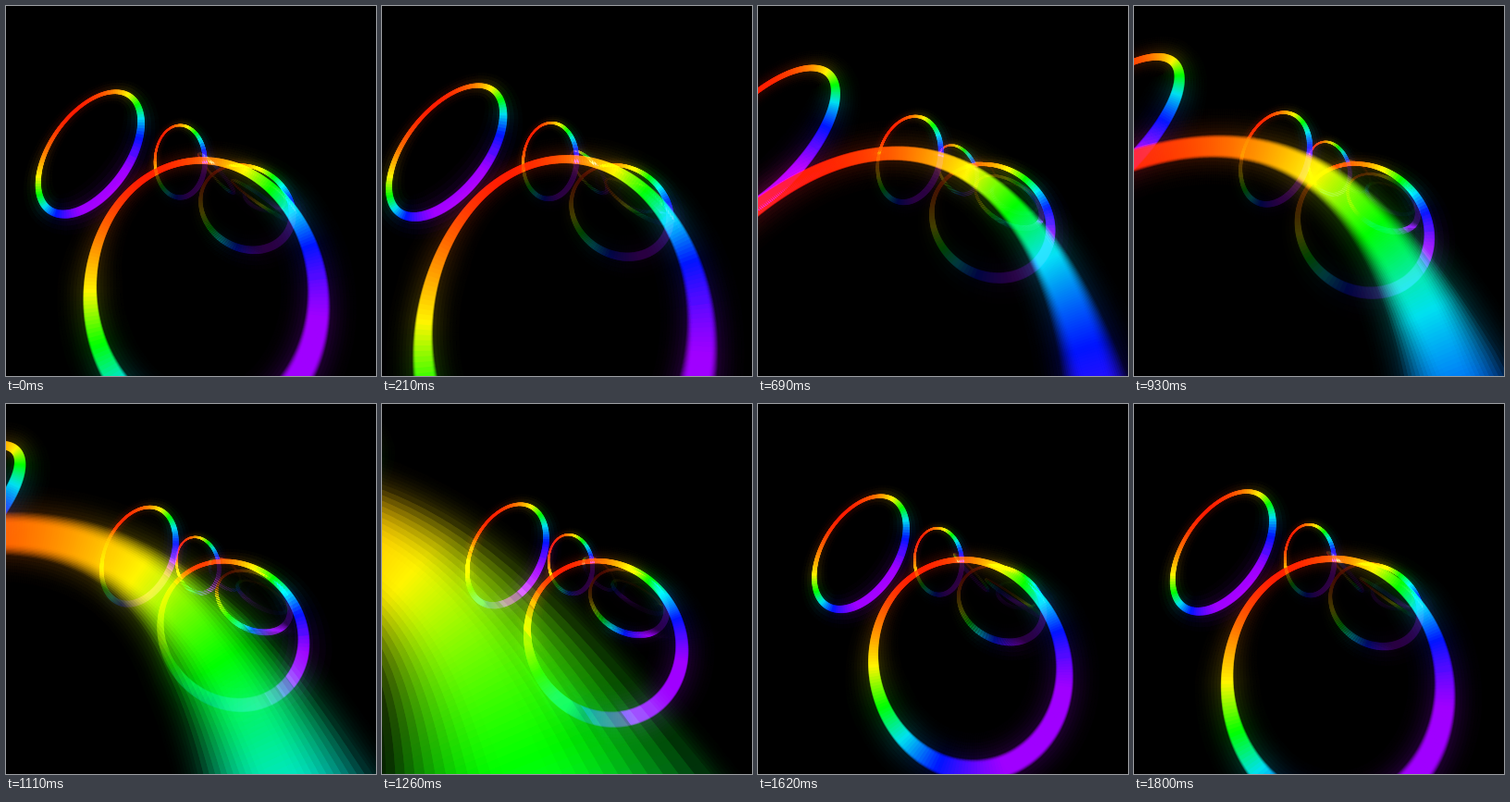
Animation, 400 px wide and 400 px high, one loop 1.83 s. Source, as an HTML page with a canvas:

```html
<!DOCTYPE html>
<html lang="en">
<head>
<meta charset="utf-8">
<title>Rainbow rings</title>
<style>
  html, body { margin: 0; width: 100%; height: 100%; overflow: hidden; background: #000; }
  canvas { display: block; width: 400px; height: 400px; }
</style>
</head>
<body>
<canvas id="stage" width="400" height="400"></canvas>
<script>
const SIZE = 400, LOOP = 1830, STEP = 30, SPACING = 1860;
const SEGMENTS = 720, GLOW_LAYERS = 8, EDGE_LAYERS = 12;
const PURPLE_ANGLE = 44 * Math.PI / 180;
const STOPS = [
  [0, 255, 30, 0], [.13, 255, 125, 0], [.29, 255, 245, 0], [.46, 0, 255, 0],
  [.61, 0, 225, 240], [.77, 0, 20, 255], [.95, 160, 0, 255], [1, 160, 0, 255]
];

const ctx = document.getElementById('stage').getContext('2d');
const buffer = document.createElement('canvas');
buffer.width = buffer.height = SIZE;
const pen = buffer.getContext('2d');

const clamp = (v, lo, hi) => Math.min(hi, Math.max(lo, v));

function rainbow(s) {
  const i = Math.max(1, STOPS.findIndex(stop => stop[0] >= s));
  const from = STOPS[i - 1], to = STOPS[i];
  const k = clamp((s - from[0]) / (to[0] - from[0]), 0, 1);
  return [1, 2, 3].map(c => from[c] + (to[c] - from[c]) * k);
}

// Layers run from the faint outer glow to the bright core.
const layers = [];
for (let i = 0; i < GLOW_LAYERS; i++) {
  const reach = 1 - i / GLOW_LAYERS;
  layers.push({ glow: reach, edge: 1, light: .01 + .17 * (1 - reach) ** 1.6 });
}
for (let i = 0; i < EDGE_LAYERS; i++) {
  const k = i / (EDGE_LAYERS - 1);
  layers.push({ glow: 0, edge: 1 - 2 * k, light: .2 + .8 * Math.sin(k * Math.PI / 2) });
}
const coarseLayers = layers.filter((_, i) => i % 2);
const COVER = [.5, 0, -.5].map(edge => ({ glow: 0, edge }));

const tones = Array.from({ length: SEGMENTS }, (_, i) => {
  const angle = i / SEGMENTS * 2 * Math.PI;
  const shade = (1 + Math.cos(angle - PURPLE_ANGLE)) / 2;
  const color = rainbow(shade);
  const fills = new Map(layers.map(l => [l, `rgb(${color.map(c => Math.round(c * l.light))})`]));
  return { cos: Math.cos(angle), sin: Math.sin(angle), shade, fills };
});

// Distant rings turn through an edge-on view before they open.
const openness = age => Math.tanh(4 * (age + 1.08));

function rightRing(age) {
  const past = Math.max(age, 0), ahead = Math.min(age, 0);
  const open = age < 0 ? openness(age) : 1;
  const lean = Math.sqrt(1 - open * open);
  const w = 80 - 7 * past ** 2.5;
  return {
    vx: 286, vy: 176, z: 1.62 - age, dz: -.175,
    x: -42 - 9 * ahead, y: 60 - 25 * ahead,
    ax: w * open, ay: 12 * open,
    bx: 4 + lean * w, by: 66 + 15 * Math.max(ahead, -1.3)
  };
}

function leftRing(age) {
  const past = Math.max(age, 0), ahead = Math.min(age, 0);
  const lean = age < 0 ? Math.sqrt(1 - openness(age) ** 2) : -.5 * age;
  const open = age < 0 ? openness(age) : Math.sqrt(1 - lean * lean);
  const w = 63 + 11 * past;
  return {
    vx: 310, vy: 180, z: 2.33 - age, dz: 0,
    x: -284 - 8 * age, y: -28 - 30 * ahead,
    ax: w * open, ay: 0,
    bx: lean * w, by: 91 - 3 * past ** 4 + 20 * Math.max(ahead, -1.3)
  };
}

function project(ring, tone) {
  const z = ring.z + ring.dz * tone.sin;
  if (z < .04) return null;
  const width = Math.min(260, (4.5 + 7.5 * tone.shade) / z * (1 + .06 / z));
  return {
    x: ring.vx + (ring.x + ring.ax * tone.cos + ring.bx * tone.sin) / z,
    y: ring.vy + (ring.y + ring.ay * tone.cos + ring.by * tone.sin) / z,
    width,
    soft: clamp((width - 4) / 80, .12, .75) * width,
    glow: Math.min(56, 6 + 4 * width),
    fills: tone.fills
  };
}

function addNormals(points) {
  const count = points.length;
  points.forEach((p, i) => {
    const before = points[(i + count - 1) % count] || p;
    const after = points[(i + 1) % count] || p;
    if (!p) return;
    const dx = after.x - before.x, dy = after.y - before.y;
    const length = Math.hypot(dx, dy) || 1;
    p.nx = -dy / length;
    p.ny = dx / length;
  });
}

function addBand(path, points, layer) {
  const half = p => (p.width + p.soft * layer.edge + p.glow * layer.glow) / 2;
  points.forEach(p => path.lineTo(p.x + p.nx * half(p), p.y + p.ny * half(p)));
  points.reverse().forEach(p => path.lineTo(p.x - p.nx * half(p), p.y - p.ny * half(p)));
  points.reverse();
  path.closePath();
}

function visible(p) {
  const margin = p.width + p.glow;
  return p.x > -margin && p.x < SIZE + margin && p.y > -margin && p.y < SIZE + margin;
}

function drawRing(ring) {
  const strength = clamp(2.3 - ring.z / 2, 0, 1);
  if (!strength) return;
  const step = ring.z > 2.2 ? 10 : ring.z > 1 ? 6 : ring.z > .4 ? 3 : 1;
  const points = tones.filter((_, i) => i % step === 0).map(tone => project(ring, tone));
  addNormals(points);
  const count = points.length;
  const bands = points
    .map((p, i) => [p, points[(i + 1) % count], points[(i + 2) % count]])
    .filter(band => band.every(Boolean) && band.some(visible));
  if (!bands.length) return;

  // Each ring hides most of what lies behind it, then adds its own light.
  ctx.globalCompositeOperation = 'source-over';
  ctx.fillStyle = `rgba(0, 0, 0, ${.37 * strength})`;
  for (const layer of COVER) {
    const path = new Path2D();
    bands.forEach(band => addBand(path, band, layer));
    ctx.fill(path);
  }

  pen.clearRect(0, 0, SIZE, SIZE);
  for (const layer of ring.z > 1 ? coarseLayers : layers) {
    for (const band of bands) {
      pen.fillStyle = band[1].fills.get(layer);
      pen.beginPath();
      addBand(pen, band, layer);
      pen.fill();
    }
  }
  ctx.globalCompositeOperation = 'lighter';
  ctx.globalAlpha = strength;
  ctx.drawImage(buffer, 0, 0);
  ctx.globalAlpha = 1;
}

function render(time) {
  const phase = Math.floor(time % LOOP / STEP) * STEP / SPACING;
  ctx.globalCompositeOperation = 'source-over';
  ctx.fillStyle = '#000';
  ctx.fillRect(0, 0, SIZE, SIZE);
  for (let k = -3; k <= 1; k++) {
    drawRing(leftRing(phase + k));
    drawRing(rightRing(phase + k));
  }
}

const start = performance.now();
function tick() {
  render(performance.now() - start);
  requestAnimationFrame(tick);
}
tick();
</script>
</body>
</html>
```
